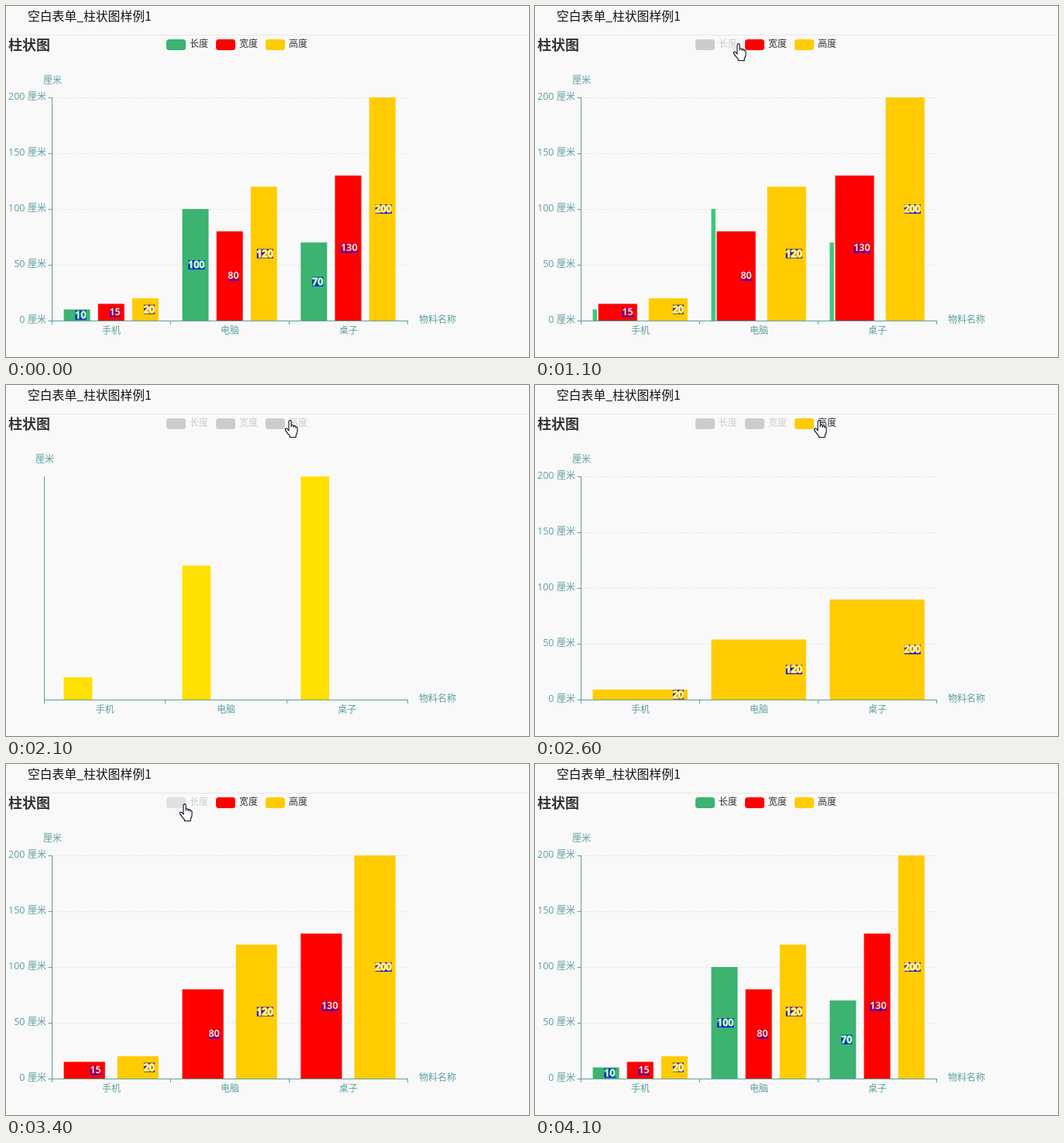
These frames come from a looping animation (675x453 px, 4.3 s). An HTML page:

```html
<!DOCTYPE html>
<html lang="zh">
<head>
<meta charset="utf-8">
<title>柱状图</title>
<style>
  html, body { margin: 0; width: 100%; height: 100%; overflow: hidden; background: #f9f9f9; }
  svg { display: block; width: 675px; height: 453px; }
  text { font: 12px "Noto Sans CJK SC", "Noto Sans CJK", sans-serif; }
  .digits { font: 12.5px "Open Sans", "Noto Sans", sans-serif; text-anchor: end; }
  .mid { text-anchor: middle; }
  .axis { fill: #5f9ea0; }
  .axis-line { fill: none; stroke: #5f9ea0; }
  .grid { stroke: #e4e4e4; stroke-dasharray: 2 2; }
  .value { font-weight: 600; fill: #fff; stroke-width: 2.4; stroke-linejoin: round; paint-order: stroke; }
  .pointer { fill: #fff; stroke: #0b0b1e; stroke-width: 1.1; stroke-linejoin: round; }
</style>
</head>
<body>
<svg viewBox="0 0 675 453">
  <rect width="675" height="453" fill="#f9f9f9"/>
  <path d="M0 37.5H675" stroke="#e7e7e7"/>
  <text x="28" y="19" style="font-size:15.8px" fill="#111">空白表单_柱状图样例1</text>
  <text x="3" y="57" style="font-size:18px;font-weight:bold" fill="#333">柱状图</text>
  <text x="533" y="409" class="axis">物料名称</text>
  <g id="scene"></g>
</svg>
<script>
const LOOP = 4300, STEP = 100, TWEEN = 300;
const BASE = 406, SCALE = 1.44, RIGHT = 518.5;
const PLOT_LEFT = 59.3, BAND = 152.9;
const categories = ['手机', '电脑', '桌子'];
const series = [
  { name: '长度', color: [60, 179, 113], values: [10, 100, 70] },
  { name: '宽度', color: [255, 0, 0], values: [15, 80, 130] },
  { name: '高度', color: [255, 204, 0], values: [20, 120, 200] }
];
const GRAY = [204, 204, 204];

// [time, toggled series]
const clicks = [[963, 0], [1465, 1], [2001, 2], [2546, 2], [3046, 1], [3546, 0]];
// [from, to, hovered series]
const hovers = [[800, 963, 0], [1800, 2001, 2], [2900, 3046, 1], [3400, 3546, 0]];
// [time, x, y] of the pointer tip
const track = [
  [200, 577, 96], [700, 234, 57], [800, 244, 50], [1000, 244, 50], [1100, 263, 48],
  [1400, 307, 45], [1600, 307, 45], [1800, 367, 45], [2700, 367, 45], [2900, 299, 51],
  [3200, 299, 51], [3400, 231, 51], [3700, 231, 51], [4000, 660, 184]
];
const HAND = 'M5.5 14V2.2a1.6 1.6 0 0 1 3.2 0V9V7.2q1.6-1 2.9.4V9.5V8q1.6-.9 2.7.5V10V9.2q1.7-.6 2.2 1V15' +
  'q0 2.6-1.8 4.6V22.5H6.8V20.6Q4 18 1.2 13.4Q.3 11.2 2.2 11Q3.6 11 5.5 14Z';
const ARROW = 'M.5.5V17L4.3 13.4 6.8 19 9 18 6.6 12.6H12Z';

const lerp = (a, b, k) => a + (b - a) * k;
const cubicOut = p => 1 - (1 - Math.min(1, p)) ** 3;
const rgb = c => `rgb(${c.map(Math.round)})`;
const lift = c => c.map(v => Math.min(255, v * 1.1));
const rect = (x, y, w, h, fill, r = 0) =>
  `<rect x="${x}" y="${y}" width="${w}" height="${h}" rx="${r}" fill="${fill}"/>`;
const text = (x, y, str, cls, attrs = '') =>
  `<text x="${x}" y="${y}" class="${cls}" ${attrs}>${str}</text>`;

// Bar offset and width within a category, for the visible series
function layout(visible) {
  const n = visible.filter(Boolean).length;
  const w = 0.8 * BAND / (n + 0.3 * (n - 1));
  let slot = 0;
  return visible.map(on => on ? { x: 0.1 * BAND + 1.3 * w * slot++, w } : null);
}

function chartState(t) {
  let before = [true, true, true], after = before, start = -TWEEN;
  for (const [time, i] of clicks) {
    if (time > t) break;
    before = after;
    after = after.map((on, j) => j === i ? !on : on);
    start = time;
  }
  return { before, after, k: cubicOut((t - start) / TWEEN) };
}

function drawAxes(hasData) {
  const left = hasData ? 59.5 : 49.5, width = (RIGHT - left) / 3;
  let out = '', lines = `M${left} 118V411M${left} 406.5H${RIGHT}`;
  if (hasData) {
    for (let v = 0; v <= 200; v += 50) {
      const y = Math.round(BASE - v * SCALE) + 0.5;
      if (v) out += `<path class="grid" d="M${left} ${y}H${RIGHT}"/>`;
      lines += `M${left - 5} ${y}H${left}`;
      out += text(24.5, y + 2.5, v, 'axis digits') + text(28, y + 2.5, '厘米', 'axis');
    }
  }
  categories.forEach((name, i) => {
    lines += `M${Math.floor(left + width * (i + 1)) + 0.5} 406V411`;
    out += text(left + width * (i + 0.5), 423, name, 'axis mid');
  });
  out += text(left + 0.5, 100, '厘米', 'axis mid');
  return { labels: out, lines: `<path class="axis-line" d="${lines}"/>` };
}

function drawBars({ before, after, k }, hover) {
  const from = layout(before), to = layout(after);
  let bars = '', labels = '';
  series.forEach((s, i) => {
    const a = from[i], b = to[i];
    if (!a && !b) return;
    const leaving = !b;
    const x0 = a && b ? lerp(a.x, b.x, k) : (a || b).x;
    const w = a && b ? lerp(a.w, b.w, k) : leaving ? a.w * (1 - k) : b.w;
    if (w < 0.1) return;
    const fill = rgb(leaving || hover === i ? lift(s.color) : s.color);
    s.values.forEach((v, c) => {
      const h = v * SCALE * (a ? 1 : k), x = PLOT_LEFT + BAND * c + x0;
      bars += rect(x, BASE - h, w, h, fill);
      if (leaving) return;
      const mid = BASE - h / 2, end = x + w - 5, size = 7 * String(v).length;
      labels += rect(end - size, mid - 6, size, 12, '#00f') +
        text(end, mid + 4, v, 'digits value', `stroke="${fill}"`);
    });
  });
  return bars + labels;
}

function drawLegend(visible, hover) {
  return series.map((s, i) => {
    const x = 207 + 64 * i, color = visible[i] ? s.color : GRAY;
    return rect(x, 43, 25, 14, rgb(hover === i ? lift(color) : color), 3.5) +
      text(x + 30, 53, s.name, '', `fill="${visible[i] ? '#333' : '#ccc'}"`);
  }).join('');
}

function drawPointer(t) {
  const next = track.findIndex(p => p[0] >= t);
  if (next < 0 || t < track[0][0]) return '';
  const b = track[next], a = track[Math.max(0, next - 1)];
  const k = b === a ? 0 : (t - a[0]) / (b[0] - a[0]);
  const x = lerp(a[1], b[1], k), y = lerp(a[2], b[2], k), hand = y < 57;
  return `<path class="pointer" d="${hand ? HAND : ARROW}" ` +
    `transform="translate(${Math.round(x) - (hand ? 7.5 : 0)} ${Math.round(y)})"/>`;
}

const scene = document.getElementById('scene');
let shown = -1;

function render(t) {
  const state = chartState(t);
  const hover = (hovers.find(([a, b]) => t >= a && t < b) || [])[2];
  const axes = drawAxes(state.after.some(Boolean));
  scene.innerHTML = axes.labels + drawBars(state, hover) + axes.lines +
    drawLegend(state.after, hover) + drawPointer(t);
}

const origin = performance.now();
function tick() {
  const t = Math.floor((performance.now() - origin) % LOOP / STEP) * STEP;
  if (t !== shown) render(shown = t);
  requestAnimationFrame(tick);
}
tick();
</script>
</body>
</html>
```
